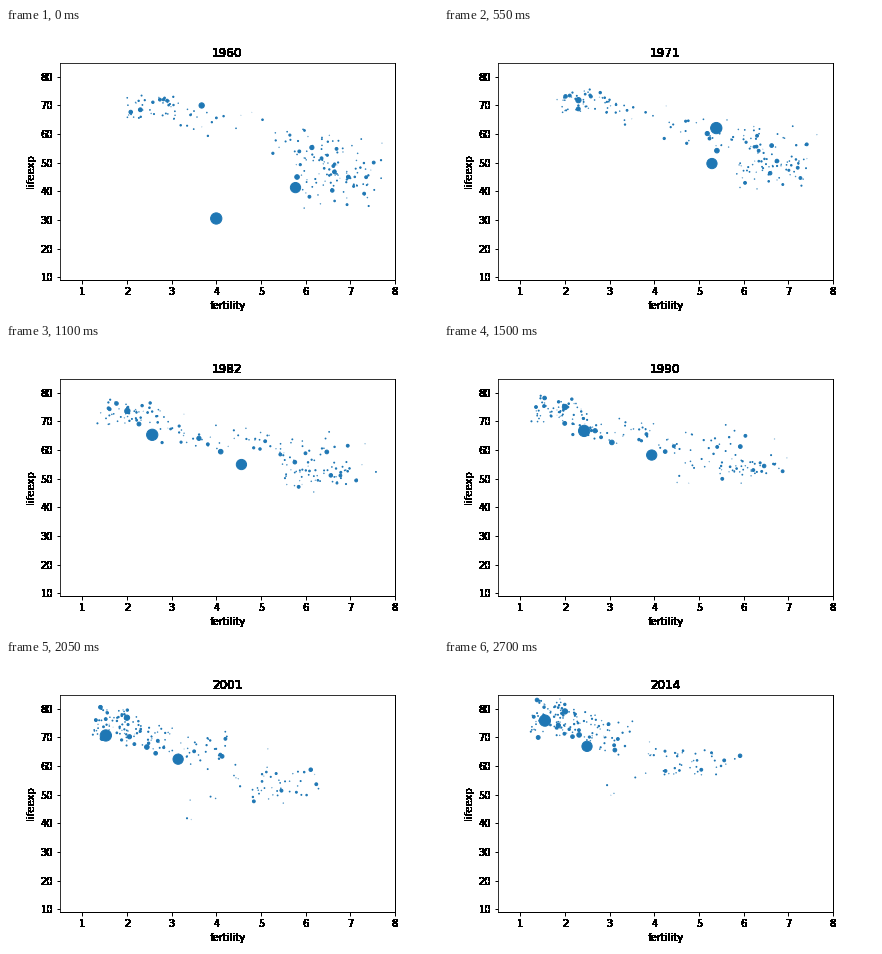
Write a matplotlib script that moves like this. It is 432 by 288 pixels and loops after 2750 ms.

```python
import numpy as np
import matplotlib.pyplot as plt
from matplotlib.animation import FuncAnimation

FIRST, LAST = 1960, 2014
BLUE = "#1f77b4"
rng = np.random.default_rng(12)


def country(pop, fert, turn, life, bend=0.85, shock=(2000, 0, 1)):
    """One bubble: fertility falls along an S curve, life rises along a power.

    turn is (middle year, pace), shock is (year, years of life lost, width).
    """
    return [pop, *fert, *turn, *life, bend, *shock]


def bloc(n, fert0, fert1, turn, pace, life0, life1, bend=0.85, loss=0):
    """Countries with every trait drawn from the given ranges."""
    def pick(span):
        return rng.uniform(*span)

    return [country(np.clip(rng.lognormal(np.log(6), 1.5), 0.1, 80),
                    (pick(fert0), pick(fert1)), (pick(turn), pace),
                    (pick(life0), pick(life1)), bend,
                    (2002, loss * rng.random(), 6))
            for _ in range(n)]


world = [
    # the most populous, in millions
    country(1050, (6.3, 1.9), (1988, 14), (41.3, 66.9), 0.7),
    country(282, (3.9, 2.0), (1966, 3), (70, 79.1), 1),
    country(211, (5.9, 2.3), (1982, 6), (45, 70.9), 0.65),
    country(175, (6.6, 1.8), (1978, 8), (55.3, 74.2)),
    country(147, (2.3, 1.4), (1992, 3), (68.5, 70), 1),
    country(138, (6.65, 3.0), (1997, 5), (46.8, 65.6), 0.45),
    country(131, (7.0, 2.1), (1988.5, 6), (45, 70.3), 0.95),
    country(127, (2.1, 1.37), (1983, 6), (67.7, 83.1), 0.65),
    country(123, (6.6, 5.9), (1997, 5), (40.3, 63.6)),
    # sudden losses of life
    country(12, (6.6, 2.7), (1993, 7), (43, 68), 1, (1977, 33, 1.8)),
    country(8, (8.3, 4.0), (1990, 5), (43, 66), 1, (1994, 44, 0.8)),
    country(8, (6.3, 3.0), (1992, 8), (43, 64), 1, (2010, 29, 0.4)),
    # from early to late transitions
    *bloc(42, (2.0, 3.2), (1.2, 2.0), (1970, 1988), 4, (65, 73.5), (72, 83.5)),
    *bloc(18, (3.2, 5.6), (1.4, 2.3), (1970, 1984), 6, (59, 69), (73, 81)),
    *bloc(40, (5.7, 7.2), (1.6, 2.8), (1972, 1988), 7, (49, 62), (70, 79)),
    *bloc(30, (6.3, 7.9), (2.0, 3.6), (1985, 1998), 7, (40, 59), (65, 77)),
    *bloc(44, (5.9, 7.5), (3.6, 5.6), (1990, 2004), 8, (34, 49), (57, 66), 0.9, 8),
    *bloc(5, (6.2, 6.8), (2.6, 3.8), (1984, 1990), 6, (43, 52), (49, 60), 0.5, 11),
]
(pop, fert0, fert1, middle, pace,
 life0, life1, bend, when, loss, width) = np.array(world).T

# The largest bubble takes a path of its own
GIANT_POP = 1270
GIANT_YEARS = [1960, 1961, 1963, 1971, 1980, 1990, 1997, 2014]
GIANT_FERT = [4.0, 3.3, 7.4, 5.39, 2.6, 2.43, 1.52, 1.55]
GIANT_LIFE = [30.5, 32, 50, 62.1, 65, 66.7, 69.1, 75.9]


def positions(year):
    fert = fert1 + (fert0 - fert1) / (1 + np.exp((year - middle) / pace))
    part = (year - FIRST) / (LAST - FIRST)
    life = life0 + (life1 - life0) * part ** bend
    life -= loss * np.exp(-((year - when) / width) ** 2)
    giant = [np.interp(year, GIANT_YEARS, path)
             for path in (GIANT_FERT, GIANT_LIFE)]
    return np.vstack([np.column_stack([fert, life]), giant])


def solid(image, dpi):
    """Make every touched pixel opaque, so that text has no soft edge."""
    image[..., 3] = image[..., 3] > 0
    return image, 0, 0


plt.rcParams.update({"font.family": "DejaVu Sans", "font.size": 10,
                     "figure.subplot.bottom": 0.125})
fig, ax = plt.subplots(figsize=(6, 4), dpi=72)
ax.set_xticks(range(1, 9))
ax.set_yticks(range(10, 81, 10))
ax.set_xlim(0.5, 8)
ax.set_ylim(9, 85)
ax.tick_params(width=1)
ax.spines[["right", "bottom"]].set_linewidth(1)
ax.set_xlabel("fertility")
ax.set_ylabel("lifeexp")
title = ax.set_title(str(FIRST), x=0.4987)
for text in [title, ax.xaxis.label, ax.yaxis.label,
             *ax.get_xticklabels(), *ax.get_yticklabels()]:
    text.set_agg_filter(solid)

dots = ax.scatter(*positions(FIRST).T, s=np.append(pop, GIANT_POP) / 10,
                  color=BLUE, linewidths=1)


def update(i):
    year = FIRST + i
    dots.set_offsets(positions(year))
    title.set_text(str(year))
    return dots, title


anim = FuncAnimation(fig, update, frames=LAST - FIRST + 1, interval=50,
                     repeat=True, blit=False)
plt.show()
```
